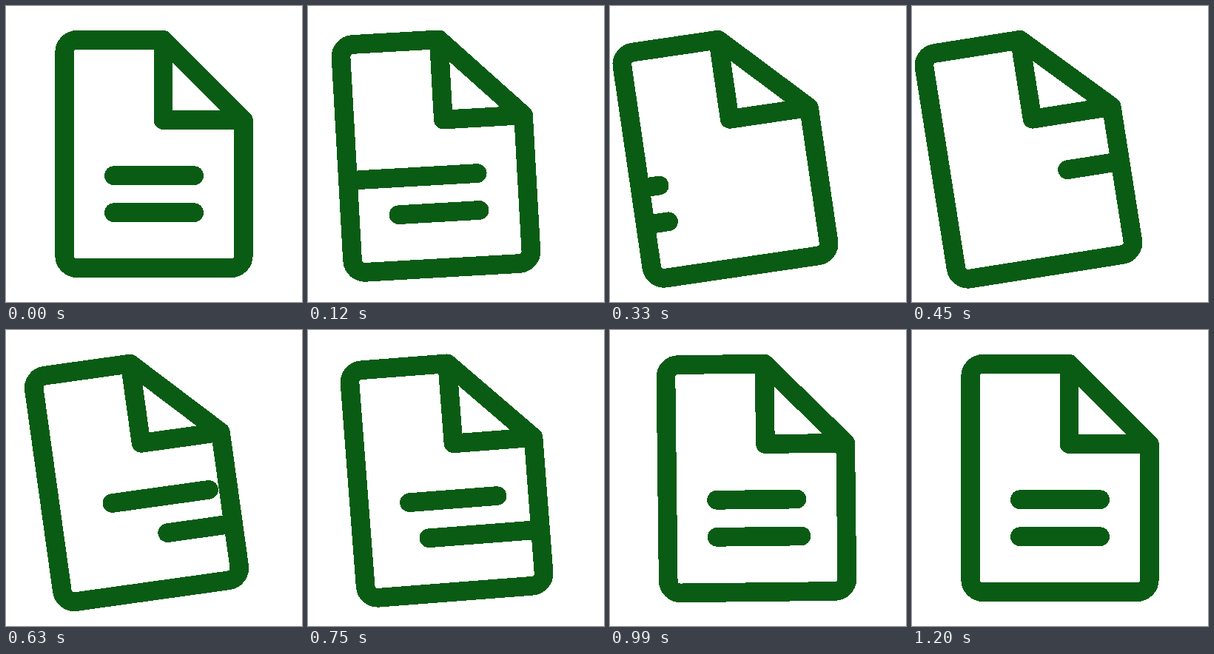
Recreate the animation shown at these times as an HTML page. Size 400 by 400 pixels, loop 3.23 s.

```html
<!DOCTYPE html>
<html lang="en">
<head>
<meta charset="utf-8">
<title>Document</title>
<style>
  html, body { margin: 0; width: 100%; height: 100%; overflow: hidden; background: #fff; }
  svg { display: block; width: 100vw; height: 100vh; }
  path {
    fill: none; stroke: #0a5c15; stroke-width: 25.7;
    stroke-linecap: round; stroke-linejoin: round; shape-rendering: crispEdges;
  }
</style>
</head>
<body>
<svg viewBox="0 0 400 400">
  <g id="page">
    <path d="M212.5 45.83H95.83A16.67 16.67 0 0 0 79.17 62.5V337.5A16.67 16.67 0 0 0 95.83 354.17H304.17A16.67 16.67 0 0 0 320.83 337.5V154.17Z"/>
    <path d="M212.5 45.83V154.17H320.83"/>
  </g>
</svg>
<script>
const LOOP = 3230, STEP = 30, END = 1200;
const EDGE_L = 79.17, EDGE_R = 320.83, LINE_L = 145.83, LINE_R = 254.17;
const page = document.getElementById('page');

// cubic-bezier(.25, 0, .25, 1)
function ease(p) {
  if (p <= 0) return 0;
  if (p >= 1) return 1;
  let lo = 0, hi = 1;
  for (let i = 0; i < 24; i++) {
    const s = (lo + hi) / 2;
    if (0.75 * s * (1 - s) + s ** 3 < p) lo = s; else hi = s;
  }
  return lo * lo * (3 - 2 * lo);
}

const tween = (t, start, end, a, b) => a + (b - a) * ease((t - start) / (end - start));

// Each line slides into the left border and comes back out of the right one.
// Time spans are [start, end] for the left and right tip.
const lines = [
  { y: 229.17, outL: [0, 250], outR: [158, 460], inL: [320, 800], inR: [515, 950] },
  { y: 279.17, outL: [105, 425], outR: [168, 470], inL: [487, 935], inR: [690, 1140] }
];

function addPath() {
  const el = document.createElementNS('http://www.w3.org/2000/svg', 'path');
  page.append(el);
  return el;
}
for (const line of lines) {
  line.leaving = addPath();
  line.entering = addPath();
}

// A line that has shrunk to nothing inside the border is not drawn.
function setLine(el, y, x1, x2) {
  el.setAttribute('d', x2 - x1 > 0.5 ? `M${x1.toFixed(2)} ${y}H${x2.toFixed(2)}` : '');
}

function draw(t) {
  const shift = t < 390 ? tween(t, 0, 320, 0, -44) : tween(t, 390, END, -44, 0);
  const tilt = t < 540 ? tween(t, 0, 485, 0, -9) : tween(t, 540, END, -9, 0);
  page.setAttribute('transform', `translate(${shift.toFixed(3)} 0) rotate(${tilt.toFixed(3)} 200 200)`);
  for (const l of lines) {
    setLine(l.leaving, l.y, tween(t, ...l.outL, LINE_L, EDGE_L), tween(t, ...l.outR, LINE_R, EDGE_L));
    setLine(l.entering, l.y, tween(t, ...l.inL, EDGE_R, LINE_L), tween(t, ...l.inR, EDGE_R, LINE_R));
  }
}

const begin = performance.now();
function tick() {
  const t = (performance.now() - begin) % LOOP;
  draw(Math.min(END, Math.floor(t / STEP) * STEP));
  requestAnimationFrame(tick);
}
tick();
</script>
</body>
</html>
```
